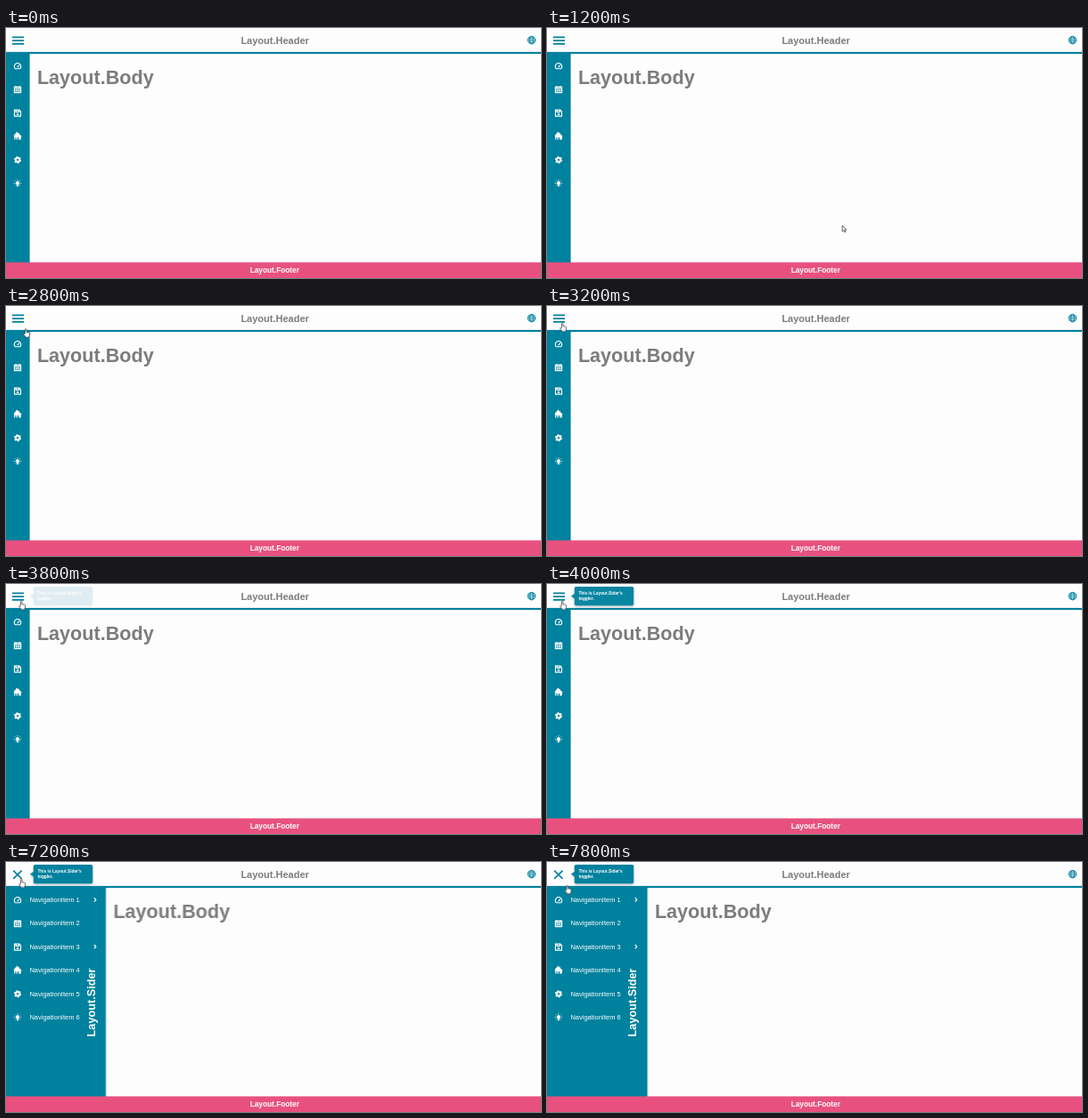
Animation of 600 by 281 pixels, one loop 8 s. Source, as an HTML page:

```html
<!DOCTYPE html>
<html lang="en">
<head>
<meta charset="utf-8">
<title>Layout</title>
<style>
  html, body { margin: 0; width: 100%; height: 100%; overflow: hidden; background: #fefdfe; }
  svg { display: block; width: 100%; height: 100%; font-family: "Liberation Sans", Arial, sans-serif; }
  .bold { font-weight: bold; }
  .teal { fill: #00819e; }
  .line { fill: none; stroke: #00819e; }
  .icon { fill: none; stroke: #fff; stroke-width: 1.15; }
  .solid { fill: #fff; stroke: none; }
  .slide, .open, .closed, .tip, .arrow, .hand { animation: 8s step-end infinite; }
  .slide { animation-name: slide; }
  .open { animation-name: open; }
  .closed { animation-name: closed; }
  .tip { animation-name: tip; }
  .arrow { animation-name: arrow; }
  .hand { animation-name: hand; }

  @keyframes slide {
    0% { transform: translateX(-86px); }
    90% { transform: translateX(-.6px); }
    92.5%, 100% { transform: none; }
  }
  @keyframes open { 0% { opacity: 0; } 90%, 100% { opacity: 1; } }
  @keyframes closed { 0% { opacity: 1; } 90%, 100% { opacity: 0; } }
  @keyframes tip {
    0% { opacity: 0; }
    47.5% { opacity: .12; }
    50% { opacity: .96; }
    62.5%, 100% { opacity: 1; }
  }
  @keyframes arrow {
    0% { opacity: 0; transform: translate(330px, 221px); }
    15% { opacity: 1; transform: translate(330px, 221px); }
    17.5% { opacity: 1; transform: translate(198px, 203px); }
    20% { opacity: 1; transform: translate(113px, 190px); }
    22.5% { opacity: 1; transform: translate(109px, 188px); }
    25% { opacity: 1; transform: translate(102px, 181px); }
    27.5% { opacity: 1; transform: translate(54px, 102px); }
    30% { opacity: 1; transform: translate(44px, 68px); }
    32.5% { opacity: 1; transform: translate(26px, 36px); }
    35%, 100% { opacity: 0; transform: translate(26px, 36px); }
  }
  @keyframes hand {
    0% { opacity: 0; transform: translate(19px, 25px); }
    35% { opacity: 1; transform: translate(19px, 25px); }
    37.5% { opacity: 1; transform: translate(16.5px, 21px); }
    40% { opacity: 1; transform: translate(14px, 18.5px); }
    97.5%, 100% { opacity: 1; transform: translate(19.5px, 25.5px); }
  }
</style>
</head>
<body>
<svg viewBox="0 0 600 281" preserveAspectRatio="none">
  <defs>
    <filter id="shadow" x="-20%" y="-30%" width="140%" height="180%">
      <feDropShadow dx="0" dy="1" stdDeviation="1.3" flood-color="#000" flood-opacity=".35"/>
    </filter>
  </defs>
  <rect width="600" height="281" fill="#fefdfe"/>

  <g class="slide">
    <rect class="teal" y="27" width="112.6" height="237"/>
    <text class="bold" x="120.9" y="63" font-size="21.6" fill="#7c7c7c">Layout.Body</text>
  </g>

  <rect class="teal" y="26.9" width="600" height="2.2"/>
  <text class="bold" x="301.6" y="17.6" font-size="11" fill="#7c7c7c" text-anchor="middle">Layout.Header</text>
  <g class="line" stroke-width="1">
    <circle cx="589.4" cy="13.6" r="4.2"/>
    <ellipse cx="589.4" cy="13.6" rx="2" ry="4.2"/>
    <path d="M585.2 13.6h8.4M585.9 11.3h7M585.9 15.9h7"/>
  </g>

  <path class="line closed" stroke-width="1.7" d="M7 10.3h13M7 14.1h13M7 17.9h13"/>
  <path class="line open" stroke-width="1.7" d="M8.2 9.7l9.4 9.2M17.6 9.7l-9.4 9.2"/>

  <g class="icon">
    <g transform="translate(13 42.8)">
      <path d="M-2.6 3A3.7 3.7 0 1 1 2.6 3zM-.3 1.4L1.9-1.2"/>
    </g>
    <g transform="translate(13 69.2)">
      <path d="M-3.6-2.8h7.2v6.2h-7.2zM-3.6-1h7.2M-2-4.2v2M2-4.2v2"/>
      <path stroke-width=".8" d="M-3.6 1.2h7.2M-1.2-1v4.4M1.2-1v4.4"/>
    </g>
    <g transform="translate(13 95.6)">
      <path d="M-3.5-3.5h5.4l1.6 1.6v5.4h-7zM-1.9-3.3v2h3.4v-2"/>
      <circle class="solid" cy="1.3" r="1.2"/>
    </g>
    <g transform="translate(13 121.4)">
      <path class="solid" d="M-4.5-.2L-.6-4.8 1-3l.9-.6v1.5L4.6.2 3.8 1v3.2H1.2V1.6H-.2v2.6h-1.2V1.6h-1.2v2.6h-1.2V.4z"/>
    </g>
    <g transform="translate(13 148.3)">
      <circle r="2.2" stroke-width="2"/>
      <circle r="3.5" stroke-width="1.2" stroke-dasharray="1.83"/>
    </g>
    <g transform="translate(13 174.6)">
      <path class="solid" d="M-1.2 1.5A2.1 2.1 0 1 1 1.2 1.5L.9 3.6H-.9z"/>
      <path stroke-width=".8" d="M-4.2-.2h1.3M2.9-.2h1.3M-3.1-3.2l.9.9M3.1-3.2l-.9.9M0-4.5v1.2M-3 2.7l.8-.8M3 2.7l-.8-.8"/>
    </g>
  </g>

  <g class="open" fill="#fff">
    <g font-size="7.5" id="labels"></g>
    <path class="icon" d="M98.8 40.2l2 2.2-2 2.2M98.8 93l2 2.2-2 2.2"/>
    <text class="bold" font-size="12.7" transform="translate(99.6 196.4) rotate(-90)">Layout.Sider</text>
  </g>

  <rect y="263.4" width="600" height="18" fill="#e8517f"/>
  <text class="bold" x="301.3" y="275" font-size="8.3" fill="#fff" text-anchor="middle">Layout.Footer</text>

  <g class="tip">
    <path class="teal" filter="url(#shadow)" d="M32.5 3h63q1.7 0 1.7 1.7v17.8q0 1.7-1.7 1.7h-63q-1.7 0-1.7-1.7V16.2L27 13.6l3.8-2.6V4.7q0-1.7 1.7-1.7z"/>
    <g class="bold" font-size="4.8" fill="#fff">
      <text x="35.4" y="12.2">This is Layout.Sider's</text>
      <text x="35.4" y="18.2">toggler.</text>
    </g>
  </g>

  <g fill="#fff" stroke="#333" stroke-width=".75" stroke-linejoin="round">
    <path class="arrow" d="M1.2 1v6.6l1.5-1.3 1 2.3 1.1-.5-1-2.2h2z"/>
    <path class="hand" d="M2.4 6V1.5a.8.8 0 0 1 1.6 0V4.2l2.9.6q1 .3.9 1.4L7.3 8.6l-.6 1.6H3.4L.8 7.1q-.4-1 .6-1z"/>
  </g>
</svg>
<script>
  const labels = document.getElementById('labels');
  for (let i = 0; i < 6; i++) {
    const label = document.createElementNS(labels.namespaceURI, 'text');
    label.setAttribute('x', 26.4);
    label.setAttribute('y', 45 + i * 26.4);
    label.textContent = `NavigationItem ${i + 1}`;
    labels.append(label);
  }
</script>
</body>
</html>
```
